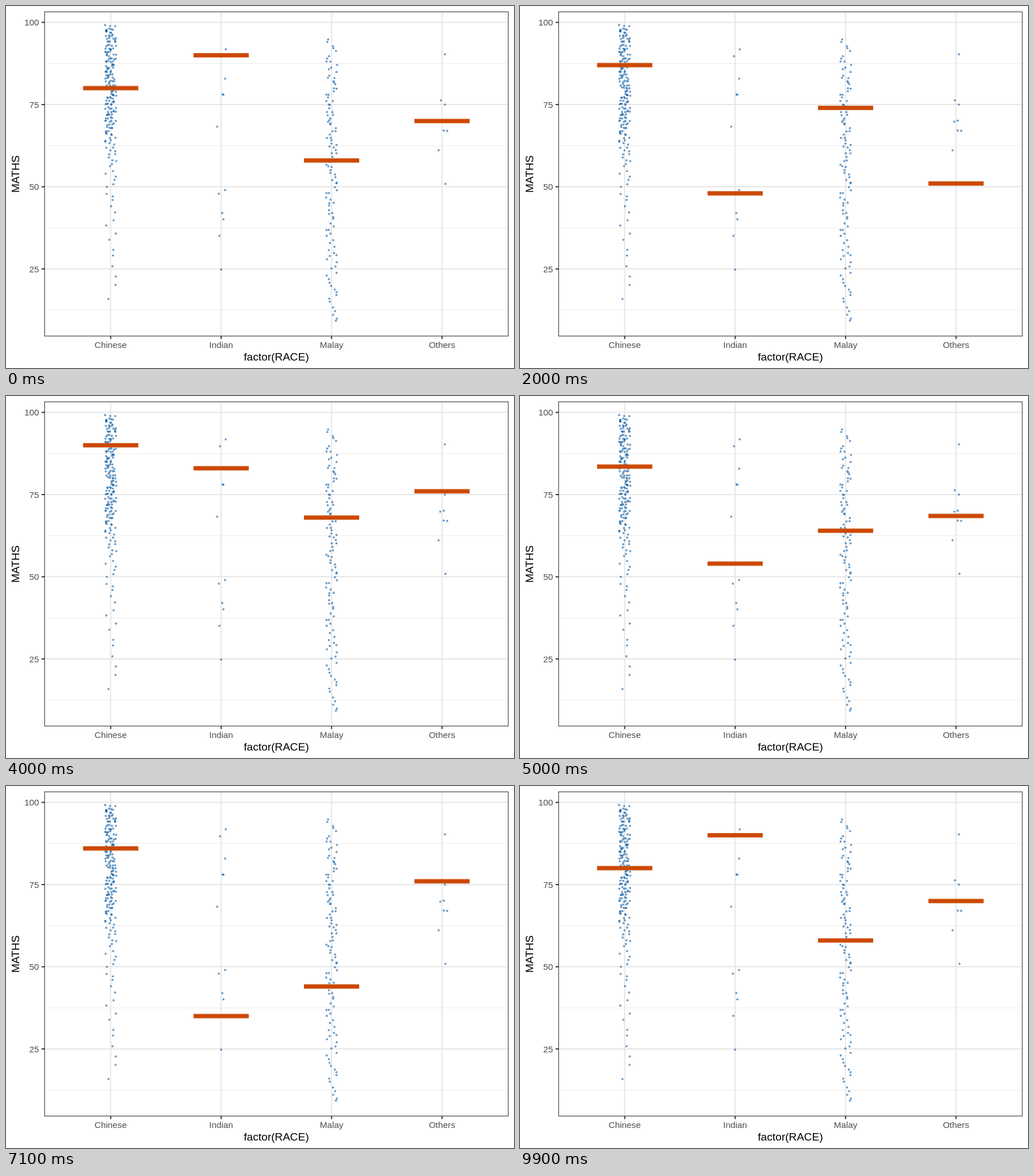
These frames come from a looping animation (885 by 632 pixels, 10000 ms). An HTML page:

```html
<!DOCTYPE html>
<html lang="en">
<head>
<meta charset="utf-8">
<title>MATHS by factor(RACE)</title>
<style>
  html, body { margin: 0; width: 100%; height: 100%; overflow: hidden; background: #fff; }
  svg { display: block; width: 885px; height: 632px; font-family: "Liberation Sans", Arial, sans-serif; }
  .major { stroke: #e6e6e6; stroke-width: 2; }
  .minor { stroke: #ebebeb; stroke-width: 1; }
  .tick { stroke: #333; stroke-width: 2; }
  .border { fill: none; stroke: #333; stroke-width: 1.1; }
  .label { font-size: 15.3px; fill: #4d4d4d; }
  .title { font-size: 19.1px; fill: #000; text-anchor: middle; }
  .dot { fill: #0a5ca5; fill-opacity: .6; }
  .bar { fill: #cc4802; }
</style>
</head>
<body>
<svg id="plot" viewBox="0 0 885 632"></svg>
<script>
const svg = document.getElementById('plot');
const panel = { left: 67.3, right: 875, top: 10.2, bottom: 576.2 };
const groups = ['Chinese', 'Indian', 'Malay', 'Others'];
const px = group => 182.4 + 192.4 * group;
const py = score => 28.6 + (100 - score) * 5.74;

function add(tag, attrs, text) {
  const el = document.createElementNS('http://www.w3.org/2000/svg', tag);
  for (const key in attrs) el.setAttribute(key, attrs[key]);
  if (text) el.textContent = text;
  return svg.appendChild(el);
}
const line = (cls, x1, y1, x2, y2) => add('line', { class: cls, x1, y1, x2, y2 });
const dot = (x, y) => add('circle', { class: 'dot', cx: x, cy: y, r: 1.9 });

// Grid, axes and labels
for (let v = 12.5; v < 100; v += 25) line('minor', panel.left, py(v), panel.right, py(v));
for (let v = 25; v <= 100; v += 25) {
  line('major', panel.left, py(v), panel.right, py(v));
  line('tick', 62, py(v), panel.left, py(v));
  add('text', { class: 'label', x: 57.6, y: py(v) + 5.7, 'text-anchor': 'end' }, String(v));
}
groups.forEach((name, g) => {
  line('major', px(g), panel.top, px(g), panel.bottom);
  line('tick', px(g), panel.bottom, px(g), 581.5);
  add('text', { class: 'label', x: px(g), y: 596.5, 'text-anchor': 'middle' }, name);
});
add('text', { class: 'title', x: 471, y: 618.5 }, 'factor(RACE)');
add('text', { class: 'title', transform: 'translate(23 293.4) rotate(-90)' }, 'MATHS');

// Large groups: whole scores along a quantile curve, with seeded jitter
let seed = 29;
function rand() {
  seed = (seed * 16807) % 2147483647;
  return seed / 2147483647;
}
const jitter = size => (rand() * 2 - 1) * size;
function cloud(group, count, quantile) {
  for (let i = 0; i < count; i++) {
    const score = Math.round(quantile(i / (count - 1)));
    dot(px(group) + jitter(9.7), py(score + jitter(.3)));
  }
}
cloud(0, 200, u => 99 - 40 * u - 43 * u ** 16);
cloud(2, 112, u => 95 - 60 * u ** .8 - 26 * u ** 3);

// Small groups: offset from the group's centre and score
const few = {
  1: [[8, 91.8], [-2, 89.7], [7, 82.9], [2.5, 78.1], [4, 78], [-7, 68.3],
      [7, 49], [-4, 47.9], [2, 42], [4, 40.1], [-3, 35.1], [0, 24.8]],
  3: [[5, 90.3], [-2, 76.3], [5, 75], [-3, 69.8], [3, 70.1], [3, 67.1],
      [9, 67], [-6, 61.1], [6, 50.9]]
};
for (const g in few)
  for (const [dx, score] of few[g]) dot(px(+g) + dx, py(score));

add('rect', {
  class: 'border', x: panel.left, y: panel.top,
  width: panel.right - panel.left, height: panel.bottom - panel.top
});

// One score per group in each draw
const draws = [
  [80, 90, 58, 70], [85, 35, 66, 70], [23, 48, 53, 67], [71, 78, 62, 67], [74, 42, 18, 70],
  [87, 48, 74, 51], [36, 92, 74, 51], [77, 90, 63, 67], [74, 49, 65, 70], [84, 68, 30, 67],
  [90, 83, 68, 76], [71, 42, 9, 90], [79, 68, 53, 67], [88, 40, 75, 70], [93, 25, 45, 70],
  [67, 48, 65, 90], [79, 92, 16, 67], [88, 68, 58, 70], [86, 35, 44, 76], [95, 78, 66, 76],
  [81, 42, 58, 70], [74, 35, 75, 61], [95, 78, 54, 67], [91, 42, 71, 75], [73, 25, 50, 67]
];
const loop = 10000, step = 100;
// Every draw takes four steps, except the twelfth, which takes three
const arrival = k => step * (4 * k - (k > 12 ? 1 : 0));

groups.forEach((_, g) => {
  const bar = add('rect', { class: 'bar', x: px(g) - 48.1, y: -3.75, width: 96.2, height: 7.5 });
  const pose = (time, score) => ({
    offset: time / loop, transform: `translateY(${py(score)}px)`, easing: 'step-end'
  });
  const poses = [pose(0, draws[0][g])];
  for (let k = 1; k <= draws.length; k++) {
    const from = draws[k - 1][g], to = draws[k % draws.length][g];
    poses.push(pose(arrival(k) - step, (from + to) / 2), pose(arrival(k), to));
  }
  poses.push(pose(loop, draws[0][g]));
  bar.animate(poses, { duration: loop, iterations: Infinity });
});
</script>
</body>
</html>
```
